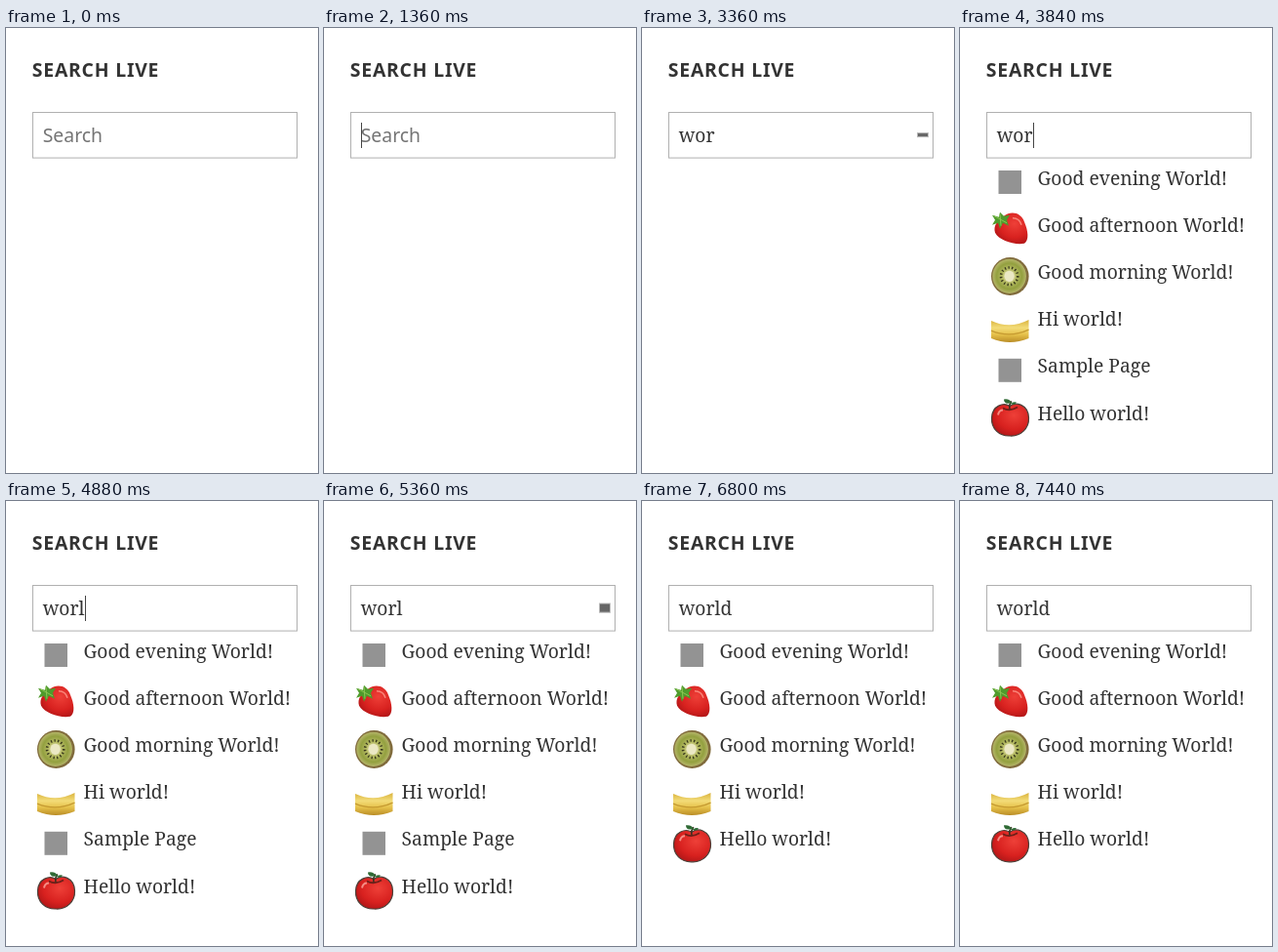
These frames come from a looping animation (320x456 px, 7520 ms). An HTML page:

```html
<!DOCTYPE html>
<html lang="en">
<head>
<meta charset="utf-8">
<title>Live search</title>
<style>
  html, body { margin: 0; width: 100%; height: 100%; overflow: hidden; background: #fff; }
  svg { display: block; width: 100%; height: 100%; }
  .sans { font-family: "Noto Sans", "Open Sans", sans-serif; font-size: 19.4px; }
  .serif { font-family: "Noto Serif", serif; font-size: 19.3px; fill: #333; }
  .title { font-weight: 700; letter-spacing: .04em; fill: #333; }
</style>
</head>
<body>
<svg viewBox="0 0 320 456">
  <defs>
    <radialGradient id="redSkin" cx=".6" cy=".35" r=".75">
      <stop offset="0" stop-color="#ee4038"/><stop offset=".6" stop-color="#d8211f"/><stop offset="1" stop-color="#a81416"/>
    </radialGradient>
    <radialGradient id="flesh">
      <stop offset=".2" stop-color="#e9e7bd"/><stop offset=".38" stop-color="#b9bd68"/>
      <stop offset=".75" stop-color="#93a03f"/><stop offset="1" stop-color="#b4b468"/>
    </radialGradient>
    <linearGradient id="peel" x2="0" y2="1">
      <stop offset="0" stop-color="#d9b23c"/><stop offset=".35" stop-color="#f3dc78"/>
      <stop offset=".65" stop-color="#e6c14a"/><stop offset="1" stop-color="#b98c25"/>
    </linearGradient>

    <g id="blank"><rect x="7.5" y="7.5" width="23.5" height="24" fill="#939393"/></g>

    <g id="strawberry">
      <path d="M13 6C21 0 31 3 34 12C38 21 39 31 34 34C24 36 8 31 4 23C2 16 6 11 13 6Z" fill="url(#redSkin)"/>
      <path d="M1 5L8 7L9 2L13 6L19 5L16 10L18 16L12 13L9 19L7 13L1 15L4 10Z" fill="#4f9b2c"/>
      <path d="M3 6L16 13M9 4L10 16" stroke="#8cc653" fill="none"/>
      <path d="M22 8Q29 8 31 15" stroke="#f98578" stroke-width="1.6" fill="none"/>
    </g>

    <g id="kiwi">
      <ellipse cx="19.3" cy="19.6" rx="19.3" ry="19.4" fill="#806b3c"/>
      <ellipse cx="18.6" cy="19.4" rx="17.3" ry="17.6" fill="url(#flesh)"/>
      <ellipse cx="18.6" cy="19.4" rx="8.6" ry="8.8" fill="none" stroke="#39391c" stroke-width="2.6" stroke-dasharray="1.3 2.3"/>
      <ellipse cx="18.6" cy="19.4" rx="5" ry="5.6" fill="#ebe8c4"/>
    </g>

    <g id="banana">
      <path d="M0 17Q19 26 38.5 16V35Q19 43 0 35Z" fill="url(#peel)"/>
      <path d="M0 27Q19 35 38.5 26" stroke="#c59a30" stroke-width="1.2" fill="none"/>
    </g>

    <g id="apple">
      <path d="M19 8C25 3 38 6 38.5 20C39 31 30 39 19.5 38.5C8 39 0 31 .5 20C1 7 13 4 19 8Z" fill="url(#redSkin)" stroke="#4b4039" stroke-width="1.2"/>
      <path d="M12 10Q19 14 27 9" stroke="#6d2019" stroke-width="1.8" fill="none"/>
      <path d="M19 11Q18 6 21 3" stroke="#3b3020" stroke-width="1.6" fill="none"/>
      <path d="M19 5Q13 6 13 1Q19 0 21 5Q23 3 26 4Q24 8 19 5Z" fill="#2f6a35"/>
      <path d="M7 17Q8 12 12 12" stroke="#f58d84" stroke-width="2" fill="none"/>
    </g>
  </defs>

  <rect width="320" height="456" fill="#fff"/>
  <text class="sans title" x="26.8" y="49.6">SEARCH LIVE</text>
  <rect x="27.5" y="86.5" width="271" height="46.6" fill="#fff" stroke="#b0b0b0"/>
  <text id="hint" class="sans" x="37.7" y="117" fill="#757575">Search</text>
  <text id="query" class="serif" x="37.7" y="117"></text>
  <rect id="caret" y="97" width="1" height="26" fill="#444"/>
  <rect id="loader" x="282.5" width="11" fill="#666" stroke="#bbb"/>
  <g id="list"></g>
</svg>
<script>
const LOOP = 7520, BLINK = 400, FOCUS = 560;
const $ = id => document.getElementById(id);
const hint = $("hint"), query = $("query"), caret = $("caret"), loader = $("loader"), list = $("list");

const keys = [[2320, "w"], [2640, "o"], [2880, "r"], [4720, "l"], [5440, "d"]];
const searches = [3200, 5040, 5760];
const SEARCH_TIME = 400;

const ROW = 48.2;
const page = ["blank", "Sample Page"];
const items = [
  ["blank", "Good evening World!"],
  ["strawberry", "Good afternoon World!"],
  ["kiwi", "Good morning World!"],
  ["banana", "Hi world!"],
  page,
  ["apple", "Hello world!"]
];

const row = ([icon, label], i) =>
  `<g transform="translate(0 ${(ROW * i).toFixed(1)})">
    <use href="#${icon}" x="32" y="138.5"/>
    <text class="serif" x="79.6" y="160.5">${label}</text>
  </g>`;

const results = [
  "",
  items.map(row).join(""),
  items.filter(item => item !== page).map(row).join("")
];
let shown = 0;

function showResults(n) {
  if (n === shown) return;
  shown = n;
  list.innerHTML = results[n];
}

function render(t) {
  const typed = keys.filter(([at]) => at <= t);
  const text = typed.map(([, char]) => char).join("");
  if (query.textContent !== text) query.textContent = text;
  hint.style.display = text ? "none" : "";

  // The caret restarts its blink on each key
  const since = typed.length ? typed[typed.length - 1][0] : FOCUS;
  const on = t >= since && Math.floor((t - since) / BLINK) % 2 === 0;
  caret.style.display = on ? "" : "none";
  caret.setAttribute("x", Math.round(38 + (text ? query.getComputedTextLength() : 0)));

  // The loader is a small square flipping about its horizontal axis
  const start = searches.find(at => t >= at && t < at + SEARCH_TIME);
  loader.style.display = start === undefined ? "none" : "";
  if (start !== undefined) {
    const h = 1 + 10 * Math.abs(Math.cos((t - start) / 400 * Math.PI));
    loader.setAttribute("y", 109.6 - h / 2);
    loader.setAttribute("height", h);
  }

  const done = searches.filter(at => t >= at + SEARCH_TIME).length;
  showResults(Math.min(done, 2));
}

const origin = performance.now();
function tick() {
  render((performance.now() - origin) % LOOP);
  requestAnimationFrame(tick);
}
tick();
</script>
</body>
</html>
```
